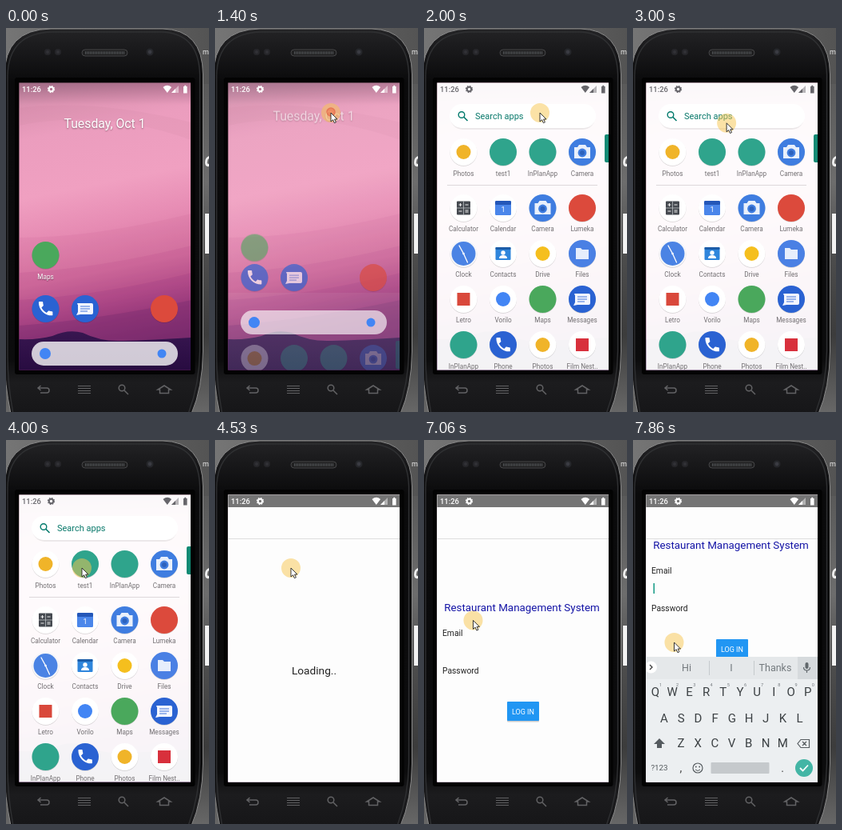
An HTML page for the animation above (8000 ms loop, 254 by 480 pixels).

```html
<!DOCTYPE html>
<html lang="en">
<head>
<meta charset="utf-8">
<title>Phone demo</title>
<style>
html,body{margin:0;width:100%;height:100%;overflow:hidden;background:#333}
svg{display:block;width:254px;height:480px;font-family:Roboto,sans-serif}
</style>
</head>
<body>
<svg id="stage" viewBox="0 0 254 480" xmlns="http://www.w3.org/2000/svg"></svg>
<script>
const stage = document.getElementById('stage');
const COLS = [49.5, 99, 148.5, 198];
const BLUE = '#2a62d2', TEAL = '#2fa48c';

// ---- drawing helpers ----
const text = (s, x, y, size, fill, extra = '') =>
  `<text x="${x}" y="${y + size * .355}" font-size="${size}" fill="${fill}" ${extra}>${s}</text>`;
const mid = (s, x, y, size, fill, extra = '') =>
  text(s, x, y, size, fill, 'text-anchor="middle" ' + extra);
const rect = (x, y, w, h, fill, r = 0, extra = '') =>
  `<rect x="${x}" y="${y}" width="${w}" height="${h}" rx="${r}" fill="${fill}" ${extra}/>`;
const disc = (x, y, r, fill, extra = '') =>
  `<circle cx="${x}" cy="${y}" r="${r}" fill="${fill}" ${extra}/>`;
const path = (d, fill, extra = '') => `<path d="${d}" fill="${fill}" ${extra}/>`;
const line = (d, color, w = 1, extra = '') =>
  `<path d="${d}" fill="none" stroke="${color}" stroke-width="${w}" ${extra}/>`;
const group = (id, body, extra = '') => `<g id="${id}" ${extra}>${body}</g>`;
const at = (x, y, body, k = 1) => `<g transform="translate(${x} ${y}) scale(${k})">${body}</g>`;
const gradient = (id, stops, extra = 'x2="0" y2="1"') =>
  `<linearGradient id="${id}" ${extra}>` +
  stops.map(([o, c]) => `<stop offset="${o}" stop-color="${c}"/>`).join('') + '</linearGradient>';

// ---- app icons, centred on 0,0 ----
const badge = fill => disc(0, .8, 17, '#000', 'opacity=".16"') + disc(0, 0, 17, fill);
const plain = (fill, square) =>
  badge('#fff') + (square ? rect(-8, -8, 16, 16, fill) : disc(0, 0, 9, fill));
const icons = {
  phone: badge(BLUE) + at(-11.5, -12, path('M6.6 10.8c1.4 2.8 3.8 5.1 6.6 6.6l2.2-2.2c.3-.3.7-.4 1-.2 1.1.4 2.3.6 3.6.6.6 0 1 .4 1 1V20c0 .6-.4 1-1 1C10.6 21 3 13.4 3 4c0-.6.4-1 1-1h3.5c.6 0 1 .4 1 1 0 1.3.2 2.5.6 3.6.1.3 0 .7-.2 1z', '#fff'), .97),
  chat: badge(BLUE) + path('M-9-7H8q2 0 2 2V5q0 2-2 2H-6l-5 1 2-4V-5q-2-2 0-2z', '#f4f6ff') +
    line('M-6-3H6M-6 0H6M-6 3H3', '#7fa0e6', 1.4),
  camera: badge('#3f7de0') + path('M-10-6h4l2-3h8l2 3h4V8h-20z', '#e9f0fb') +
    disc(0, 1, 5.4, '#3f7de0') + disc(0, 1, 3, '#2c62bd'),
  calc: badge('#fff') + rect(-8.5, -8.5, 17, 17, '#454a50', 1) + line('M0-8.5V8.5M-8.5 0H8.5', '#b9bec2', .8) +
    line('M-6-4h4M-4-6v4M2-4h4M-6 4h4M2 3h4M2 5h4', '#fff', .9),
  calendar: badge('#fff') + rect(-10, -9, 20, 18, '#4a86ea', 1.5) + rect(-10, -9, 20, 5, '#2457b8', 1.5) +
    mid('1', 0, 2, 9, '#fff'),
  clock: badge('#f4f6fa') + disc(0, 0, 15, '#4a83e4') +
    line('M-5.5-10L0 0 5 11', '#fff', 1.3, 'stroke-linecap="round"') + disc(0, 0, 1.3, '#fff'),
  contacts: badge('#fff') + rect(-9.5, -8, 19, 16, '#2f86dc', 1) + rect(-9.5, -8, 19, 3, '#1c5da8', 1) +
    disc(0, -1, 2.7, '#fff') + path('M-5 6q0-4 5-4t5 4z', '#fff'),
  files: badge('#4a80e4') + path('M-8-7h6l2 2H8V7H-8z', '#e6eefc'),
  robot: badge(TEAL),
  round: badge('#dc4a3c'),
  map: badge('#4aa85c'),
  photos: plain('#f0b429'), drive: plain('#f5bf1e'), search: plain('#4285f4'),
  mail: plain('#d9483b', true), film: plain('#d8303c', true)
};
const grid = [
  [155, 182, 'photos Photos,robot test1,robot InPlanApp,camera Camera'],
  [225, 251, 'calc Calculator,calendar Calendar,camera Camera,round Lumeka'],
  [282, 308, 'clock Clock,contacts Contacts,drive Drive,files Files'],
  [339, 365, 'mail Letro,search Vorilo,map Maps,chat Messages'],
  [396, 423, 'robot InPlanApp,phone Phone,photos Photos,film Film Nest..']
];
const drawerIcons = grid.map(([y, ly, row]) => row.split(',').map((item, i) => {
  const cut = item.indexOf(' ');
  return at(COLS[i], y, icons[item.slice(0, cut)]) + mid(item.slice(cut + 1), COLS[i], ly, 8.2, '#737073');
}).join('')).join('');

// ---- phone and desktop ----
const body = 'M6 482Q-2 445 -2 410V60Q-2 2 56 1H196Q246 2 246.5 58V404Q246 450 232 482Z';
const phone = rect(0, 0, 254, 480, 'url(#desk)') + rect(0, 0, 254, 70, 'url(#glow)') +
  path('M254 160q-5 2-5 8 0 6 5 5v-3q-3 0-2-3 0-3 2-4z', '#eee') +
  rect(249, 232, 6, 50, '#f2f2f2') + text('m', 246, 30, 9, '#eee') +
  path(body, 'url(#shell)', 'stroke="#8a8a8a" stroke-width="1"') +
  line('M9 482Q2 445 2 410V60Q3 6 58 5H194Q241 6 242.500 58V404Q242 446 228 482', '#2f3032', 1.4) +
  rect(11, 62, 225.5, 371, '#030303', 3) +
  rect(95, 27, 57, 8, '#202021', 4, 'stroke="#454547"') +
  line('M99 31H149', '#55585b', 3.5, 'stroke-dasharray="1 1"') +
  [52, 65].map(x => disc(x, 30, 4, '#26262a') + disc(x, 30, 2, '#323237')).join('') +
  disc(180, 30, 4.5, '#26272b') + disc(180, 30, 2.4, '#3a3b42') +
  `<g fill="none" stroke="#626264" stroke-width="1.5">
   <path d="M43.500 447l-3.500 3 3.500 3M41 450H51q3 0 3 3t-3 3H43"/><path d="M90 447.500h16M90 450.500h16M90 453.500h16M90 456.500h16" stroke-width="1"/>
   <circle cx="145" cy="450" r="3.800"/><path d="M148 453l5 5"/><path d="M190 452l8-5 8 5h-2.500v4.500h-11V452z"/></g>`;

// ---- status bar ----
const status = text('11:26', 20, 77, 9.4, 'currentColor', 'font-weight="500"') +
  disc(56.5, 76.5, 2.7, 'none', 'stroke="currentColor" stroke-width="2"') +
  disc(56.5, 76.5, 4, 'none', 'stroke="currentColor" stroke-width="1.3" stroke-dasharray="1.6 1.54"') +
  path('M196.500 74q5.300-4.500 10.600 0l-5.300 7z', 'currentColor') +
  path('M216 72v9h-9z', 'currentColor', 'opacity=".45"') + path('M212 76v5h-5z', 'currentColor') +
  path('M222 73h1.300v-1.300h2V73h1.300v8.500H222z', 'currentColor');

// ---- home screen ----
const wallpaper = rect(16, 68, 216, 361, 'url(#sky)') +
  path('M16 100Q110 88 232 118V140Q120 100 16 122z', '#c77f9f', 'opacity=".14"') +
  path('M16 262Q110 262 232 232V430H16z', '#c2568f', 'opacity=".13"') +
  path('M16 306Q120 300 232 272V430H16z', '#b04386', 'opacity=".16"') +
  path('M16 340Q120 334 232 306V430H16z', '#96357c', 'opacity=".2"') +
  path('M16 372Q120 364 232 340V430H16z', '#6a2468', 'opacity=".28"') +
  path('M16 389Q40 390 58 385Q78 376 96 381Q116 391 140 391T232 387V430H16z', 'url(#hill)') +
  rect(16, 68, 216, 28, 'url(#shade)');
const dock = at(COLS[0], 351, icons.phone) + at(COLS[1], 351, icons.chat) + at(COLS[3], 351, icons.round);
const home = group('work',
  mid('Tuesday, Oct 1', 123.5, 119.5, 15.8, '#fff', 'style="text-shadow:0 1px 2px #0006"') +
  at(49.5, 284, icons.map)) +
  group('mapName', mid('Maps', 49.5, 311, 8.2, '#fff', 'style="text-shadow:0 1px 1px #0007"')) +
  group('dock', dock);

// ---- app drawer ----
const drawer = group('panel', rect(16, 73, 216, 700, '#fff') + line('M16 73.500H232', '#fff')) +
  group('pillShade', rect(33, 97, 181, 30, '#000', 15)) +
  group('pill', rect(32, 95, 183, 30, '#fff', 15)) +
  group('homePill', disc(49, 110, 7, '#4285f4') + disc(195, 110, 5.5, '#4285f4')) +
  group('findPill', disc(47, 108.5, 3.8, 'none', 'stroke="#00796b" stroke-width="1.4"') +
    line('M49.800 111.300l4.700 4.700', '#00796b', 1.6) + text('Search apps', 64, 110.5, 11, '#0b7a6c')) +
  group('apps', drawerIcons + line('M29 196.500H217', '#ddd8db') + rect(226, 133, 8, 35, '#128a74', 2));

// ---- app screens ----
const login = mid('Restaurant Management System', 122.5, 209.5, 13.4, '#1414a6') +
  text('Email', 23, 241, 10.3, '#222') + text('Password', 23, 288, 10.3, '#222') +
  rect(104, 328.5, 40, 24, '#000', 1, 'opacity=".2"') + rect(104, 327, 40, 24, '#2196f3', 1) +
  mid('LOG IN', 124, 339.5, 9, '#fff') +
  group('caret', rect(25.5, 257, 1.5, 13, '#159b85'));

const keyRow = (keys, x0, y) => [...keys].map((k, i) => mid(k, x0 + i * 21.2, y, 15, '#3c4144')).join('');
const keyboard = rect(16, 271, 216, 158, '#eceff1') + rect(16, 271, 216, 28, '#e5e8ea') + rect(206, 271, 26, 28, '#d6dadd') +
  disc(22.5, 284, 7.5, '#fff') + line('M21 281l3 3-3 3', '#444', 1.4) +
  mid('Hi', 67, 285, 12.5, '#747a7e') + mid('I', 123, 285, 12.5, '#747a7e') + mid('Thanks', 178, 285, 12.5, '#747a7e') +
  line('M95.500 276V294M151.500 276V294', '#c5cacd') +
  rect(215.5, 278, 4, 8, '#61686c', 2) + line('M213.500 284q0 4 4 4t4-4M217.500 288v3', '#61686c', 1.2) +
  keyRow('QWERTYUIOP', 28, 315) + keyRow('ASDFGHJKL', 39, 347.5) + keyRow('ZXCVBNM', 60, 379) +
  [...'1234567890'].map((d, i) => mid(d, 34.5 + i * 21.2, 306, 5.6, '#767c80')).join('') +
  path('M33 373l7 7h-4v5h-6v-5h-4z', '#555b5f') +
  line('M210 374.500H220.500V384.500H210L206 379.500zM212 377l5 5M217 377l-5 5', '#555b5f', 1.2) +
  mid('?123', 33, 410, 9.8, '#555b5f') + mid(',', 60, 410, 14, '#444') + mid('.', 187, 410, 14, '#444') +
  disc(81, 410, 6, 'none', 'stroke="#555b5f" stroke-width="1.2"') +
  disc(78.8, 408.5, .9, '#555b5f') + disc(83.2, 408.5, .9, '#555b5f') + line('M78 412q3 3 6 0', '#555b5f') +
  rect(97.5, 403, 73, 14, '#c5c9cc', 1) + disc(214, 410, 11, '#43b5a5') + line('M209 410l3.500 3.500 6.500-7', '#fff', 1.8);

const app = rect(16, 68, 216, 361, '#fdfdfd') + rect(16, 68, 216, 16, '#757575') +
  group('loading', mid('Loading..', 124, 288, 13.7, '#222')) +
  group('login', login) + line('M16 123.500H232', '#dedede') + group('keys', keyboard);

stage.innerHTML = '<defs>' +
  gradient('desk', [[0, '#5e5e5e'], [.15, '#5a5a5a'], [.4, '#6d6d6d'], [.6, '#4c4c4c'], [.8, '#3c3c3c'], [1, '#676767']]) +
  gradient('glow', [[0, '#757575'], [1, '#545454']], 'x2="1" y2="0"') +
  gradient('shell', [[0, '#242426'], [.05, '#1a1a1c'], [.14, '#0a0a0b'], [.86, '#0c0c0d'], [.92, '#1c1c1e'], [1, '#161618']]) +
  gradient('sky', [[0, '#c98ba6'], [.1, '#dd93b2'], [.2, '#eb9dbe'], [.4, '#f0a0c1'], [.55, '#e68bb3'], [.7, '#d3719f'], [.8, '#b3508a'], [.88, '#8a3474'], [1, '#5c1d5c']], 'x2=".12" y2="1"') +
  gradient('hill', [[0, '#381650'], [1, '#270b40']]) +
  '<linearGradient id="shade" x2="0" y2="1"><stop stop-color="#402038" stop-opacity=".3"/><stop offset="1" stop-color="#402038" stop-opacity="0"/></linearGradient>' +
  '<clipPath id="screen"><rect x="16.4" y="68.6" width="214.6" height="359"/></clipPath>' +
  '<clipPath id="window"><rect id="frame"/></clipPath></defs>' + phone +
  group('display', wallpaper + group('scrim', rect(16, 68, 216, 361, '#fff')) + home + group('drawer', drawer) +
    group('app', app, 'clip-path="url(#window)"') + group('status', status), 'clip-path="url(#screen)"') +
  group('mouse', disc(0, 0, 12, '#f8c54e', 'opacity=".5"') +
    group('press', disc(0, -1, 5, '#ee6a45', 'stroke="#e0452f" stroke-width="1.5" opacity=".55"')) +
    path('M0 0V11l2.600-2.300 1.800 4 2-.9-1.800-3.800H8z', '#fff', 'stroke="#222" stroke-width=".9"'));

// ---- motion ----
const $ = {};
stage.querySelectorAll('[id]').forEach(e => $[e.id] = e);
const clamp = v => Math.min(1, Math.max(0, v));
const span = (t, a, b) => clamp((t - a) / (b - a));
const mix = (a, b, k) => a + (b - a) * k;
const smooth = k => k * k * (3 - 2 * k);
const out = k => 1 - (1 - k) ** 3;
const set = (id, name, v) => $[id].setAttribute(name, v);
const fade = (id, v) => set(id, 'opacity', clamp(v));
const show = (id, on) => set(id, 'visibility', on ? 'visible' : 'hidden');
const move = (id, x, y) => set(id, 'transform', `translate(${x} ${y})`);

// time, x, y of the pointer
const route = [
  [60, -22, 330], [260, 6, 345], [400, 6, 345], [740, 147, 395], [1200, 145, 106], [2460, 145, 106],
  [3260, 108, 123], [3330, 108, 123], [3800, 95, 160], [6330, 95, 160], [6860, 62, 224], [7000, 62, 224], [7460, 51.5, 253]
];
function pointer(t) {
  const i = route.findIndex(r => r[0] > t);
  if (i === 0) return route[0].slice(1);
  if (i < 0) return route[route.length - 1].slice(1);
  const [a, b] = [route[i - 1], route[i]], k = smooth(span(t, a[0], b[0]));
  return [mix(a[1], b[1], k), mix(a[2], b[2], k)];
}
const held = [[760, 1460], [4130, 4260], [7330, 7460]];

function draw(t) {
  const p = t < 1460 ? .131 * span(t, 1250, 1400) : mix(.131, 1, out(span(t, 1460, 1960)));
  fade('scrim', .95 * p ** 1.3);
  move('work', 0, -72 * p);
  fade('work', 1 - 3 * p);
  move('mapName', 0, -72 * p);
  fade('mapName', 1 - 10 * p);
  move('dock', 0, -297 * p);
  fade('dock', 1 - 2.6 * p);
  move('drawer', 0, 297 * (1 - p));
  fade('panel', .5 * p * (1 - p));
  fade('pillShade', .07 * p);
  fade('pill', Math.max(.78 - 1.1 * p, p));
  fade('homePill', 1 - span(p, .25, .6));
  fade('findPill', span(p, .4, .8));
  fade('apps', p * 2.3);

  const open = out(span(t, 4260, 4500));
  show('app', t >= 4260);
  fade('app', span(t, 4250, 4340));
  const box = { x: mix(82, 16, open), y: mix(138, 68, open), width: mix(34, 216, open), height: mix(34, 361, open), rx: mix(17, 0, open) };
  for (const k in box) set('frame', k, box[k]);

  const typing = t >= 7860;
  fade('loading', 1 - span(t, 5000, 5120));
  fade('login', span(t, 5060, 5340));
  move('login', 0, typing ? -78 : 0);
  show('caret', typing);
  show('keys', t >= 7800);
  move('keys', 0, typing ? 0 : 60);
  set('status', 'color', p > .85 && t < 4380 ? '#66656a' : '#fff');

  move('mouse', ...pointer(t));
  show('mouse', t > 60);
  show('press', held.some(([a, b]) => t >= a && t < b));
}

const start = performance.now();
function tick() {
  draw((performance.now() - start) % 8000);
  requestAnimationFrame(tick);
}
tick();
</script>
</body>
</html>
```
